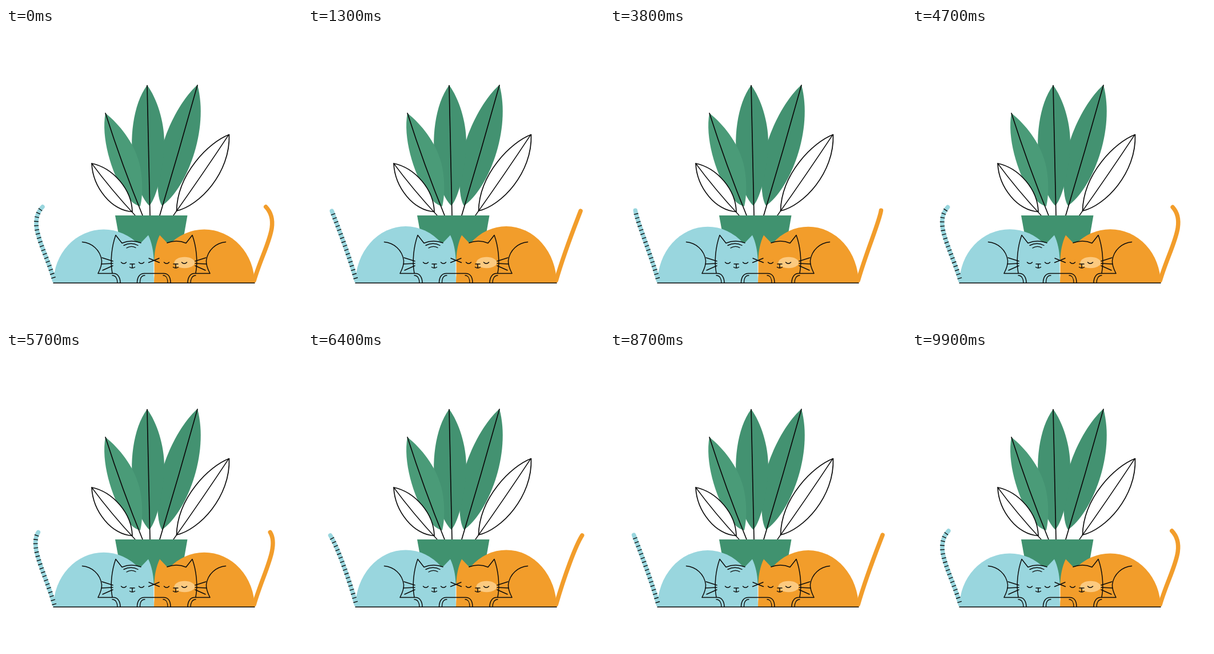
An HTML page with a canvas for the animation above (10 s loop, 518 px wide and 518 px high).

```html
<!DOCTYPE html>
<html lang="en">
<head>
<meta charset="utf-8">
<title>Sleeping cats</title>
<style>
html, body { margin: 0; width: 100%; height: 100%; overflow: hidden; background: #fff; }
canvas { display: block; width: 518px; height: 518px; }
</style>
</head>
<body>
<canvas id="stage" width="518" height="518"></canvas>
<script>
const SIZE = 518, LOOP = 10000, BREATH = 5000, STEP = 100;
const BLUE = '#99d6de', ORANGE = '#f29d2b', PATCH = '#fcca80';
const POT = '#40926f', LEAF = '#439271', LEAF_LIGHT = '#4a9b78', INK = '#0c0c0c';
const ctx = document.getElementById('stage').getContext('2d');

function fill(d, color) {
  ctx.fillStyle = color;
  ctx.fill(new Path2D(d));
}

function line(d, width = 1.5, color = INK) {
  ctx.strokeStyle = color;
  ctx.lineWidth = width;
  ctx.stroke(new Path2D(d));
}

const mix = (a, b, k) => a + (b - a) * k;

// Tail control points at rest and at full breath
const TAIL_IN = [[64, 313], [36, 342], [68, 385], [84.5, 442]];
const TAIL_OUT = [[22, 326.5], [60, 336], [71, 395], [84.5, 442]];

function tailPoints(k) {
  return TAIL_IN.map((p, i) => [mix(p[0], TAIL_OUT[i][0], k), mix(p[1], TAIL_OUT[i][1], k)]);
}

function bezier(p, t) {
  const u = 1 - t;
  const at = i => u * u * u * p[0][i] + 3 * u * u * t * p[1][i] + 3 * u * t * t * p[2][i] + t * t * t * p[3][i];
  return [at(0), at(1)];
}

function drawTail(p, color, width) {
  line(`M${p[0]} C${p[1]} ${p[2]} ${p[3]}`, width, color);
}

// Stripes at even distances along the tail
function drawStripes(p) {
  const gap = 7.4, half = 3.9;
  let prev = p[0], run = 0, next = 6;
  for (let i = 1; i <= 300; i++) {
    const q = bezier(p, i / 300);
    const dx = q[0] - prev[0], dy = q[1] - prev[1], len = Math.hypot(dx, dy);
    run += len;
    if (run >= next) {
      const nx = -dy / len * half, ny = dx / len * half;
      line(`M${q[0] - nx} ${q[1] - ny} L${q[0] + nx} ${q[1] + ny}`, 1.4);
      next += gap;
    }
    prev = q;
  }
}

function drawPlant() {
  fill('M335 99.5 C304 127 266 196 265 262 C265 288 268 304 273 311 C316 281 356 178 335 99.5Z', LEAF);
  fill('M247 100 C222 134 215 196 224 245 C230 279 240 301 251 311 C265 295 276 243 277 200 C277 163 264 123 247 100Z', LEAF);
  fill('M174 149 C166 191 184 252 207 288 C217 303 226 310 235 312 C240 293 240 258 232 232 C223 200 199 169 174 149Z', LEAF_LIGHT);
  line('M174 149 Q203 240 239 328', 1.7);
  line('M247 100.5 L252 328', 1.7);
  line('M335 100 Q303 215 269 328', 1.7);

  const whiteRight = 'M390.5 186.5 C355 200 300 255 298.5 320 C338 311 393 254 390.5 186.5Z';
  const whiteLeft = 'M150 237 C188 245 220 283 221 321.5 C185 320 152 279 150 237Z';
  for (const d of [whiteRight, whiteLeft]) {
    fill(d, '#fff');
    line(d, 1.7);
  }
  line('M390 186.5 Q344 256 293 328', 1.4);
  line('M150 237 Q184 283 226 328', 1.4);
  fill('M191 328 H317.5 L304 405 H205Z', POT);
}

function drawCatFill(color, rise) {
  ctx.fillStyle = color;
  ctx.beginPath();
  ctx.ellipse(171, 446.5, 88, 94 + rise, 0, Math.PI, 0);
  ctx.fill();
  fill('M185 430 C183 405 186 380 192 362.5 L203 376 Q219 372 236 376 L249 362.5 C255 375 258 390 258.5 404 V446.5 H185Z', color);
}

function drawCatLines() {
  // back and front leg
  line('M133.5 374.5 C150 376 165 388 167.5 407 C168 415 165 422 161 429.5 H189 C196 430 200 437 200 446');
  line('M186 433 C192 433 195 439 195 446', 1.3);
  // head
  line('M186 429 C182 408 185 382 192 362.5 L203 376.5 Q219 370 236 376');
  // whiskers
  line('M168 402 L187 408 M167 413 L187 412 M169 424 L187 416');
  line('M250 403 L268.5 410.5', 1.4);
  // face
  line('M201.5 410 Q206 414.5 210.5 410 M232.5 410 Q237 414.5 241.5 410');
  line('M217 413 H225 M221 413 V419 M216.5 418.5 Q221 421.5 225.5 418.5');
}

function mirrored(draw, axis = 518) {
  ctx.save();
  ctx.translate(axis, 0);
  ctx.scale(-1, 1);
  draw();
  ctx.restore();
}

function render(ms) {
  const t = Math.floor((ms % LOOP) / STEP) * STEP;
  const k = (1 - Math.cos(2 * Math.PI * t / BREATH)) / 2;
  const rise = 10.3 * k, tail = tailPoints(k);

  ctx.fillStyle = '#fff';
  ctx.fillRect(0, 0, SIZE, SIZE);
  ctx.lineCap = ctx.lineJoin = 'round';

  drawPlant();
  drawTail(tail, BLUE, 7.5);
  mirrored(() => drawTail(tail, ORANGE, 7.5), 518.7);
  mirrored(() => drawCatFill(ORANGE, rise));
  drawCatFill(BLUE, rise);
  ctx.lineCap = 'butt';
  drawStripes(tail);
  ctx.lineCap = 'round';

  ctx.fillStyle = PATCH;
  ctx.beginPath();
  ctx.ellipse(312.5, 410.5, 18, 9.7, 0, 0, 2 * Math.PI);
  ctx.fill();

  drawCatLines();
  mirrored(drawCatLines);
  line('M206 380.5 Q219 374 231 380.5 M211 385 Q219 380 227 384.5', 1.4);

  // middle paws and floor
  line('M229.5 446 C229.5 436 234 429.5 242 429.5 H276 C284 429.5 288 436 288 446');
  line('M234.5 446 C234.5 438 237 433 243 433 M283 446 C283 438 280 433 275 433', 1.3);
  line('M83 446.3 H435', 1.5);
}

const start = performance.now();
function frame() {
  render(performance.now() - start);
  requestAnimationFrame(frame);
}
frame();
</script>
</body>
</html>
```
